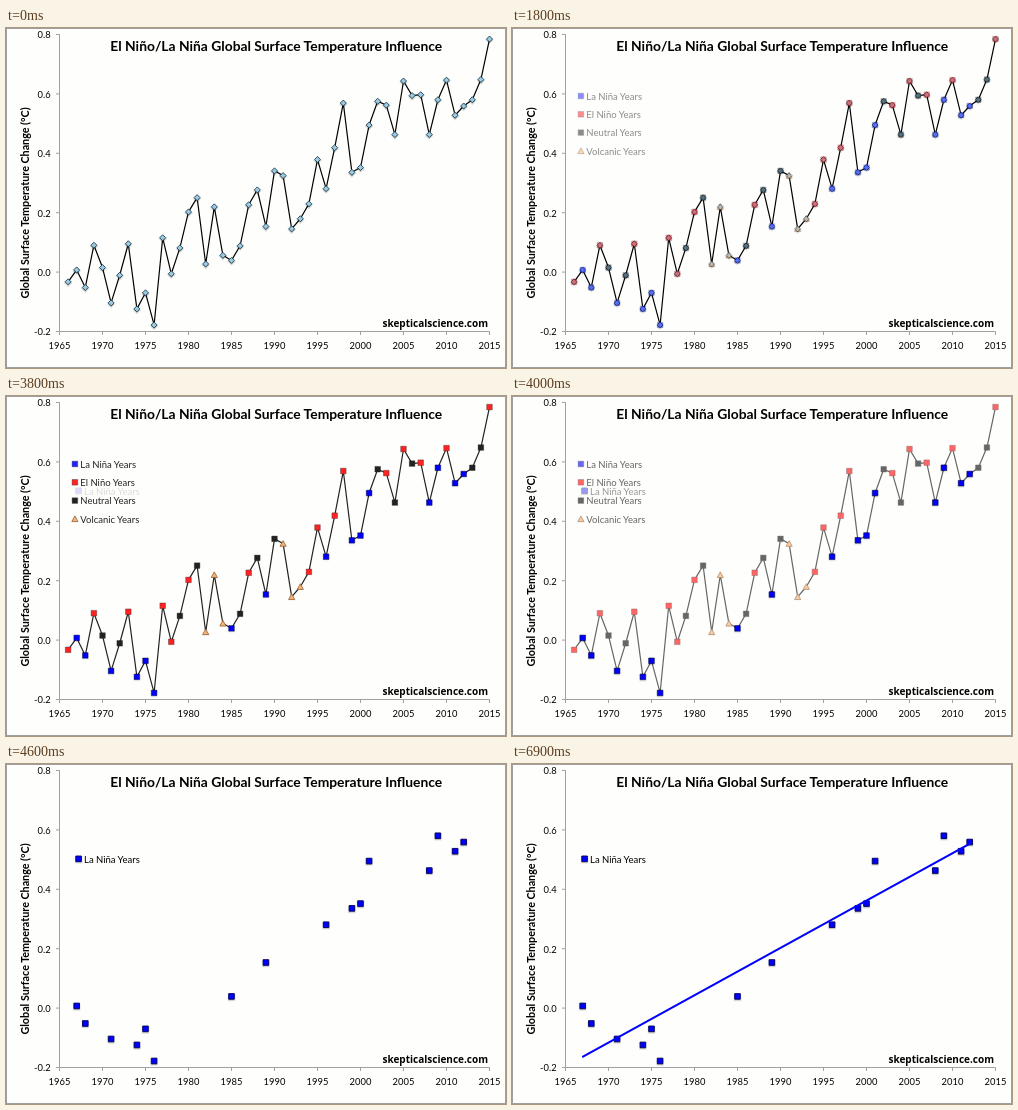
An HTML page for the animation above (8000 ms loop, 500 by 340 pixels).

```html
<!DOCTYPE html>
<html lang="en">
<head>
<meta charset="utf-8">
<title>El Niño/La Niña Global Surface Temperature Influence</title>
<style>
html, body { margin: 0; width: 100%; height: 100%; overflow: hidden; background: #fefefc; }
svg { display: block; width: 500px; height: 340px; font: 9.5px Lato, sans-serif; fill: #000; }
.bold { font-weight: 700; }
.title { font-size: 13.85px; }
.axis-name { font-size: 10.75px; }
.site { font: 700 10px "Open Sans", sans-serif; }
.tick { font-size: 9.4px; }
.paper { fill: #fefefc; }
.grid { fill: none; stroke: #a0a0a0; }
.series { fill: none; stroke: #000; stroke-width: 1.2; stroke-linejoin: round; }
.trend { stroke: #00f; stroke-width: 2.1; stroke-linecap: round; }

/* Each layer fades in over nine 100 ms steps. */
#types, #nina, #trend { animation: 8s linear infinite; }
#types { animation-name: show-types; }
#nina { animation-name: show-nina; }
#trend { animation-name: show-trend; }
@keyframes show-types {
  0% { opacity: 0; animation-timing-function: step-end; }
  18.75% { opacity: 0; animation-timing-function: steps(9, jump-start); }
  30%, 100% { opacity: 1; }
}
@keyframes show-nina {
  0% { opacity: 0; animation-timing-function: step-end; }
  47.5% { opacity: 0; animation-timing-function: steps(3, jump-start); }
  51.25% { opacity: .4; animation-timing-function: steps(3, jump-start); }
  55% { opacity: .72; animation-timing-function: steps(3, jump-start); }
  58.75%, 100% { opacity: 1; }
}
@keyframes show-trend {
  0% { opacity: 0; animation-timing-function: step-end; }
  76.25% { opacity: 0; animation-timing-function: steps(9, jump-start); }
  87.5%, 100% { opacity: 1; }
}
</style>
</head>
<body>
<svg viewBox="0 0 500 340">
  <rect class="paper" width="500" height="340"/>
  <g id="plain"></g>
  <g id="types"></g>
  <g id="nina"></g>
  <g id="trend"><path class="trend" d="M71 292.7L457.5 79.8"/></g>
  <g id="frame"></g>
</svg>
<script>
const START = 1966;
// Thousandths of a degree, one value per year
const temps = [
  -33, 7, -52, 90, 15, -104, -11, 95, -124, -70,
  -178, 115, -6, 81, 202, 250, 27, 219, 56, 39,
  88, 226, 276, 153, 340, 324, 145, 179, 229, 378,
  280, 418, 568, 335, 351, 494, 574, 561, 462, 642,
  593, 596, 462, 579, 645, 527, 558, 579, 647, 783
];
// B: La Niña, R: El Niño, K: neutral, V: volcanic
const kinds = "RBBRKBKRBB" + "BRRKRKVVVB" + "KRKBKVVVRR" + "BRRBBBKRKR" + "KRBBRBBKKR";
const fills = { B: "#00f", R: "#f00", K: "#000", V: "#f9a75c" };

const px = year => 53.5 + (year - 1965) * 8.6;
const py = t => 244 - t * 0.2975;
const points = temps.map((t, i) => ({ x: px(START + i), y: py(t), kind: kinds[i] }));

const fill = (id, parts) => document.getElementById(id).innerHTML = parts.join("");
const text = (x, y, str, cls = "", anchor = "start", more = "") =>
  `<text x="${x}" y="${y}" class="${cls}" text-anchor="${anchor}" ${more}>${str}</text>`;
const shape = (x, y, d, style) => `<path transform="translate(${x} ${y})" d="${d}" ${style}/>`;

const DIAMOND = "M0-3L3 0L0 3L-3 0Z";
const SQUARE = "M-2.8-2.8H2.8V2.8H-2.8Z";
const TRIANGLE = "M0-3L3.1 2.7H-3.1Z";

const shadow = (x, y, d) =>
  shape(x, y + 1, d, 'fill="#000" fill-opacity=".22" stroke="#000" stroke-opacity=".12" stroke-width="2"');
const diamond = ({ x, y }) => shadow(x, y, DIAMOND) +
  shape(x, y, DIAMOND, 'fill="#9ccbe0" stroke="#21425a" stroke-width=".9"');
const marker = ({ x, y, kind }) => kind === "V"
  ? shape(x, y, TRIANGLE, `fill="${fills.V}" stroke="#7a4a20" stroke-width=".8"`)
  : shape(x, y, SQUARE, `fill="${fills[kind]}" stroke="#000" stroke-opacity=".6" stroke-width=".6"`);
const ninaMarker = ({ x, y }) => shadow(x, y, SQUARE) +
  shape(x, y, SQUARE, 'fill="#00f" stroke="#00005a" stroke-width=".9"');

const backdrop = '<rect class="paper" width="500" height="340"/>';
const line = `<polyline class="series" points="${points.map(p => `${p.x},${p.y}`).join(" ")}"/>`;
const legend = [["B", "La Niña"], ["R", "El Niño"], ["K", "Neutral"], ["V", "Volcanic"]]
  .map(([kind, name], i) => {
    const y = 68 + i * 18.3;
    return marker({ x: 68.9, y, kind }) + text(74.3, y + 3.6, name + " Years");
  });

fill("plain", [line, ...points.map(diamond)]);
fill("types", [backdrop, line, ...points.map(marker), ...legend]);
fill("nina", [
  backdrop,
  ...points.filter(p => p.kind === "B").map(ninaMarker),
  ninaMarker({ x: 72.6, y: 94.8 }),
  text(78, 98.6, "La Niña Years")
]);

let ticks = "M53.5 6.5V303.5H483.5";
const labels = [];
for (let i = 0; i <= 5; i++) {
  const y = 303.5 - i * 59.4;
  ticks += `M50 ${y}H53.5`;
  labels.push(text(44.7, y + 3.8, (i * 0.2 - 0.2).toFixed(1), "tick", "end"));
}
for (let year = 1965; year <= 2015; year += 5) {
  ticks += `M${px(year)} 303.5V307`;
  labels.push(text(px(year), 321, year, "tick", "middle"));
}
fill("frame", [
  `<path class="grid" d="${ticks}"/>`,
  '<rect class="grid" x=".5" y=".5" width="499" height="339"/>',
  ...labels,
  text(270.3, 23, "El Niño/La Niña Global Surface Temperature Influence", "bold title", "middle"),
  text(0, 0, "Global Surface Temperature Change (°C)", "bold axis-name", "middle",
    'transform="translate(23.2 175) rotate(-90)"'),
  text(482, 299.4, "skepticalscience.com", "site", "end")
]);
</script>
</body>
</html>
```
